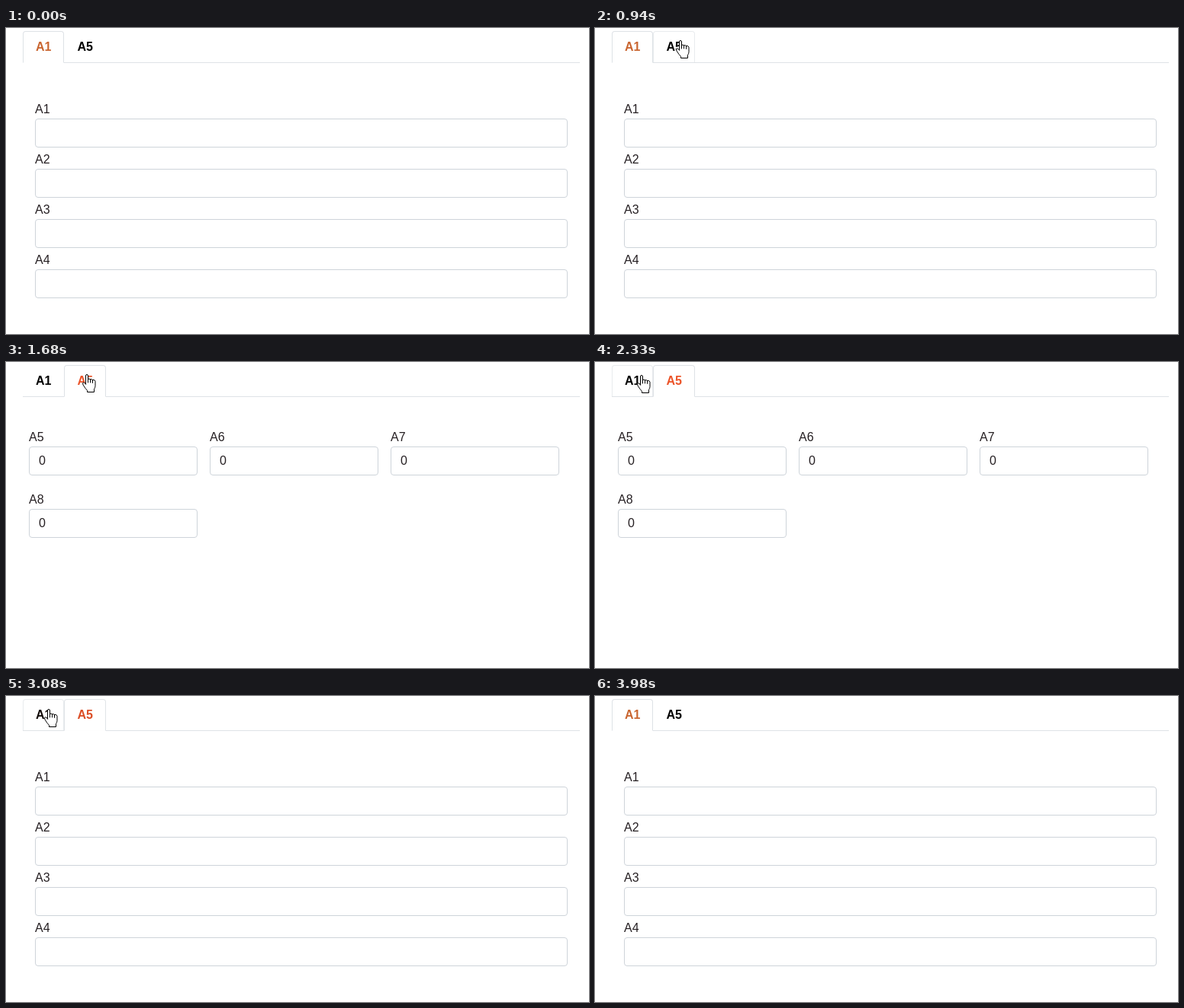
An HTML page for the animation above (4.68 s loop, 764 by 402 pixels).

```html
<!DOCTYPE html>
<html lang="en">
<head>
<meta charset="utf-8">
<title>Tabs</title>
<style>
  html, body { margin: 0; width: 100%; height: 100%; overflow: hidden; background: #fff; }
  body { position: relative; font: 16px/24px "Liberation Sans", Arial, sans-serif; color: #251f22; }
  * { box-sizing: border-box; }
  nav, .pane, svg { position: absolute; }
  nav { left: 22px; top: 4px; width: 730px; height: 42px; display: flex; border-bottom: 1px solid #dee2e6; }
  .tab { height: 42px; padding: 8px 16px; border: 1px solid; border-radius: 4px 4px 0 0; font-weight: 700; }
  .pane { display: grid; }
  #first { left: 38px; top: 95px; grid: auto / 698px; row-gap: 4px; }
  #second { left: 30px; top: 87px; grid: auto / repeat(3, 221px); gap: 20px 16px; }
  .box { height: 38px; padding: 6px 12px; border: 1px solid #ced4da; border-radius: 4px; }
  svg { inset: 0; width: 764px; height: 402px; fill: #fff; stroke: #000; stroke-linejoin: round; stroke-linecap: round; }
</style>
</head>
<body>
<nav><div class="tab">A1</div><div class="tab">A5</div></nav>
<div class="pane" id="first"></div>
<div class="pane" id="second"></div>
<svg viewBox="0 0 764 402">
  <path id="arrow" d="M.5 .7V16.3L4.1 13L6.6 18.5L8.9 17.5L6.5 12.1H11.4Z"/>
  <g id="hand">
    <path d="M-1.5 13V2a1.5 1.5 0 0 1 3 0V6.5q1.6-1 3 .4q1.7-.7 3 .6q3-.5 3.5 1.8V15.4q0 2-1.5 4.2V23.5H.5V21.4Q-2 19-5 14q-1.2-2.7 .5-3.2q1.3-.2 3 2.2Z"/>
    <path d="M1.5 6.5V11M4.5 7V11M7.5 7.6V11.4" fill="none"/>
  </g>
  <path id="beam" fill="none" d="M-3-7.5H-1L0-7L1-7.5H3M0-7V7M-3 7.5H-1L0 7L1 7.5H3"/>
</svg>
<script>
const LOOP = 4680;
const STEP = 65;                       // the picture refreshes about this often, in ms
const OPEN = 1300, CLOSE = 3080;       // second pane shown between these
const ACCENTS = [[201, 101, 48], [236, 84, 41]];

// Cursor moves; it rests at the end of each until the next one, or until it hides.
const moves = [
  { at: 230, end: 330, from: [566, 179], to: [566, 179], hide: 330 },
  { at: 610, end: 940, from: [188, 22], to: [112, 16], ease: 1.7 },
  { at: 1610, end: 1820, from: [110, 16], to: [98, 16], ease: 1 },
  { at: 2000, end: 2450, from: [95, 16], to: [56, 17], ease: 1.7 },
  { at: 3150, end: 3470, from: [56, 17], to: [453, 180], ease: 1 },
  { at: 3470, end: 3920, from: [453, 180], to: [674, 391], ease: 1.7, hide: 3980 }
];

const $ = id => document.getElementById(id);
const clamp = v => Math.min(1, Math.max(0, v));
const smooth = v => v * v * (3 - 2 * v);
const field = (n, value) => `<div>A${n}<div class="box">${value}</div></div>`;

$('first').innerHTML = [1, 2, 3, 4].map(n => field(n, '')).join('');
$('second').innerHTML = [5, 6, 7, 8].map(n => field(n, 0)).join('');
const tabs = document.querySelectorAll('.tab');

function cursorAt(t) {
  const m = moves.findLast(m => m.at <= t);
  if (!m || t >= m.hide) return null;
  const count = Math.round((m.end - m.at) / STEP);
  const part = clamp(Math.floor((t - m.at) / (m.end - m.at) * count) / count);
  const eased = 1 - (1 - part) ** (m.ease || 1);
  return m.from.map((v, i) => Math.round(v + (m.to[i] - v) * eased));
}

function cursorKind([x, y]) {
  if (y < 46 && x >= 22 && x < 131) return 'hand';
  const inBox = x > 38 && x < 736 && y >= 119 && y < 355 && (y - 119) % 66 < 38;
  return inBox ? 'beam' : 'arrow';
}

// Stepped colour change that begins at the given time.
function fade(t, begin) {
  if (t < begin) return 0;
  const held = Math.floor((t - begin) / STEP) * STEP;
  return smooth(clamp((held + 30) / 180));
}

function draw(t) {
  const pos = cursorAt(t);
  const kind = pos && cursorKind(pos);
  for (const id of ['arrow', 'hand', 'beam']) {
    $(id).style.display = id === kind ? '' : 'none';
    if (id === kind) $(id).setAttribute('transform', `translate(${pos})`);
  }

  const mix = fade(t, OPEN) - fade(t, CLOSE);
  const hovered = kind === 'hand' ? +(pos[0] >= 76) : -1;
  tabs.forEach((tab, i) => {
    const active = i ? mix : 1 - mix;
    const edge = Math.max(active, i === hovered ? .68 : 0);
    tab.style.borderColor = `rgba(222, 226, 230, ${edge})`;
    tab.style.borderBottomColor = `rgba(255, 255, 255, ${active})`;
    tab.style.color = `rgb(${ACCENTS[i].map(c => Math.round(c * active))})`;
  });

  const second = t >= OPEN && t < CLOSE;
  $('first').style.display = second ? 'none' : '';
  $('second').style.display = second ? '' : 'none';
}

const start = performance.now();
function tick() {
  draw((performance.now() - start) % LOOP);
  requestAnimationFrame(tick);
}
tick();
</script>
</body>
</html>
```
